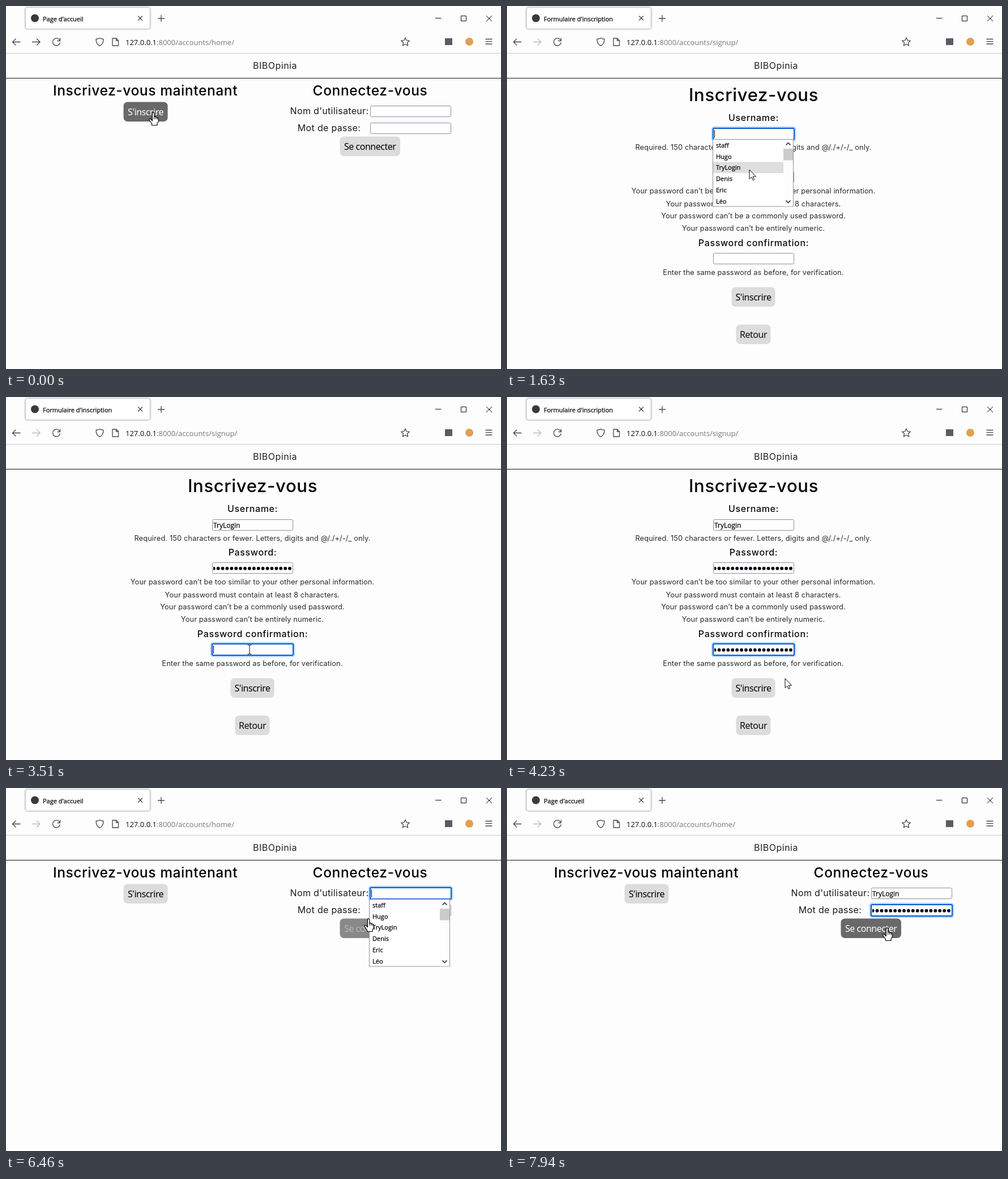
These frames come from a looping animation (874 px wide and 641 px high, 8000 ms). An HTML page:

```html
<!DOCTYPE html>
<html lang="fr">
<head>
<meta charset="utf-8">
<title>Inscription</title>
<style>
html, body { margin: 0; width: 100%; height: 100%; overflow: hidden; background: #fdfdfd; }
#stage { display: block; width: 874px; height: 641px; }
text { font-family: "Open Sans", "Noto Sans", sans-serif; fill: #0c0c0d; }
.mid { text-anchor: middle; }
.brand, .h1, .h2, .label, .plain, .help { font-family: Inter, sans-serif; }
.brand { font-size: 16px; letter-spacing: .03em; fill: #222; }
.h1 { font-size: 31px; font-weight: 450; letter-spacing: .022em; fill: #000; }
.h2 { font-size: 24.5px; font-weight: 450; letter-spacing: .025em; fill: #000; }
.label { font-size: 16px; font-weight: 500; letter-spacing: .04em; }
.plain { font-size: 16px; letter-spacing: .02em; fill: #1a1a1a; }
.help { font-size: 12.8px; letter-spacing: .01em; fill: #2a2a2a; }
.btn { font-size: 16px; letter-spacing: -.03em; font-family: "Noto Sans", "Open Sans", sans-serif; }
.tab { font-size: 11px; }
.url { font-size: 13px; }
.value { font-size: 12px; }
.row { font-size: 11px; }
.tab, .value, .row { fill: #000; stroke: #000; stroke-width: .25px; }
.icon { fill: none; stroke: #45454f; stroke-width: 1.3; stroke-linecap: round; stroke-linejoin: round; }
.win { fill: none; stroke: #111; stroke-width: 1; }
</style>
</head>
<body>
<svg id="stage" viewBox="0 0 874 641">
  <defs>
    <filter id="soft" x="-10%" y="-30%" width="120%" height="160%">
      <feDropShadow dx="0" dy="0" stdDeviation="1.6" flood-color="#000" flood-opacity=".45"/>
    </filter>
    <clipPath id="tabClip"><rect x="35" y="3" width="218.500" height="37" rx="4"/></clipPath>
  </defs>
  <rect width="874" height="641" fill="#fdfdfd"/>

  <g id="chrome">
    <rect x="32" y="1" width="225" height="41" rx="5" fill="#ececee"/>
    <rect x="35" y="3" width="218.500" height="37" rx="4" fill="#fff" filter="url(#soft)"/>
    <g clip-path="url(#tabClip)"><circle id="burst" cx="51" cy="22" fill="#2090ff"/></g>
    <circle cx="51" cy="21.500" r="7" fill="#3a3a3a"/>
    <text id="title" class="tab" x="65" y="26.500"></text>
    <path class="icon" d="M233.500 18l7 7m0-7l-7 7M268.500 22h11M274 16.500v11"/>
    <path class="win" d="M758 21.500h10.500M803.500 17.500h9v9h-9zM848 17l10 10m0-10l-10 10"/>
    <path class="icon" d="M25 63.500H11.500m5.500-5.500l-5.500 5.500 5.500 5.500"/>
    <path id="forward" class="icon" d="M46.500 63.500H60m-5.500-5.500l5.500 5.500-5.500 5.500"/>
    <path id="reload" class="icon" d="M94.500 60a6.500 6.500 0 1 0 .8 5M95.500 57v4.500H91"/>
    <path class="icon" d="M165.500 56.500c2 1.300 4 1.800 6.500 2 0 5.500-1.500 9.500-6.500 12-5-2.500-6.500-6.500-6.500-12 2.500-.2 4.500-.7 6.500-2z"/>
    <path class="icon" d="M188 57h6.500l4 4v9H188zM194.500 57v4h4"/>
    <path class="icon" d="M705 56l2.200 4.700 5.200.6-3.900 3.500 1.100 5.200-4.600-2.700-4.600 2.700 1.100-5.200-3.900-3.500 5.200-.6z"/>
    <rect x="775" y="57" width="13" height="12" fill="#5b5b66"/>
    <circle cx="818" cy="63" r="7" fill="#e0a050"/>
    <path class="icon" d="M847 58.500h11M847 62.700h11M847 67h11"/>
    <text class="url" x="211" y="69">127.0.0.1<tspan id="path" fill="#77777d"></tspan></text>
    <path d="M0 83.500H874" stroke="#ccccd0"/>
    <path d="M0 127.500H874" stroke="#111"/>
    <text class="brand mid" x="475" y="111">BIBOpinia</text>
  </g>

  <g id="home"></g>
  <g id="signup"></g>
  <g id="list"></g>
  <rect id="status" x="-.5" y="637.500" width="166" height="6" fill="#f0f0f4" stroke="#c4c4cc"/>
  <g id="cursor" stroke="#000" fill="#fff" stroke-linejoin="round">
    <path id="arrow" d="M0 0V16.500L3.800 13L6.300 18.600L8.700 17.600L6.300 12.200H11.500Z"/>
    <g id="hand">
      <path stroke-width="1.200" d="M-1.700 1.600a1.700 1.700 0 0 1 3.400 0V8a1.700 1.700 0 0 1 3 .8a1.600 1.600 0 0 1 2.600.9a1.400 1.400 0 0 1 2 1.200V16L7 19V22.500H-2.500V20L-7 13.500a1.500 1.500 0 0 1 2.200-2L-1.700 14.500Z"/>
      <path fill="none" d="M1.700 8v4M4.700 9v3M7.200 10v2.500"/>
    </g>
    <path id="beam" fill="none" d="M-3.500-8H-1L0-7.200 1-8H3.500M0-7V7M-3.500 8H-1L0 7.200 1 8H3.500"/>
  </g>
</svg>

<script>
const LOOP = 8000, TO_SIGNUP = 440, TO_HOME = 5290;
const USER = "TryLogin";
const $ = id => document.getElementById(id);
const clamp = v => v < 0 ? 0 : v > 1 ? 1 : v;
const easeOut = p => 1 - (1 - clamp(p)) ** 2;
const show = (el, on) => el.setAttribute("visibility", on ? "inherit" : "hidden");

function add(parent, tag, attrs, content) {
  const el = document.createElementNS("http://www.w3.org/2000/svg", tag);
  for (const k in attrs) el.setAttribute(k, attrs[k]);
  if (content) el.textContent = content;
  parent.appendChild(el);
  return el;
}
const box = (parent, x, y, width, height, fill, rx = 0) =>
  add(parent, "rect", { x, y, width, height, fill, rx });
const centred = (parent, cls, x, y, str) =>
  add(parent, "text", { class: cls + " mid", x, y }, str);

function button(parent, x, y, w, str) {
  const back = box(parent, x, y, w, 34.5, "#dcdcdc", 7);
  const label = centred(parent, "btn", x + w / 2, y + 23.5, str);
  return level => {
    const mix = (a, b) => Math.round(a + (b - a) * level);
    const bg = mix(220, 105), fg = mix(0, 255);
    back.setAttribute("fill", `rgb(${bg},${bg},${bg})`);
    label.style.fill = `rgb(${fg},${fg},${fg})`;
  };
}

// filled: time the value appears; focus: [from, to]
function field(parent, x, y, secret, filled, focus) {
  const idle = add(parent, "rect", { x: x + .5, y: y + .5, width: 142, height: 19, rx: 2, fill: "#fff", stroke: "#8f8f9d" });
  const ring = add(parent, "g", {});
  box(ring, x - 4, y - 4, 151, 28, "#e6f2ff", 6);
  box(ring, x - 3, y - 3, 149, 26, "#a9d5ff", 5);
  box(ring, x - 1, y - 1, 145, 22, "#0a58d0", 3);
  box(ring, x + 1, y + 1, 141, 18, "#fff", 1);
  const value = add(parent, "svg", { x: x + 2, y, width: 140, height: 20 });
  if (secret) {
    for (let i = 0; i < 18; i++)
      add(value, "circle", { cx: 135 - i * 7.9, cy: 10.7, r: 2.9, fill: "#000" });
  } else add(value, "text", { class: "value", x: 0, y: 14.5 }, USER);
  const caret = box(parent, x + 2, y + 3, 1, 14, "#000");
  return (t, blink) => {
    const focused = t >= focus[0] && t < focus[1], full = t >= filled;
    show(idle, !focused);
    show(ring, focused);
    show(value, full);
    show(caret, focused && blink);
    caret.setAttribute("x", x + (!full ? 2 : secret ? 140 : 51));
  };
}

const home = $("home"), signup = $("signup"), list = $("list");

centred(home, "h2", 246, 158, "Inscrivez-vous maintenant");
centred(home, "h2", 643, 158, "Connectez-vous");
centred(home, "plain", 571, 191, "Nom d'utilisateur:");
centred(home, "plain", 570.5, 220.5, "Mot de passe:");
const joinBtn = button(home, 207.5, 169.5, 78, "S'inscrire");
const loginBtn = button(home, 589.5, 230.5, 106.5, "Se connecter");

centred(signup, "h1", 435.5, 167.5, "Inscrivez-vous");
[["Username:", 203], ["Password:", 280], ["Password confirmation:", 423.5]]
  .forEach(([str, y]) => centred(signup, "label", 435.5, y, str));
[["Required. 150 characters or fewer. Letters, digits and @/./+/-/_ only.", 254],
 ["Your password can’t be too similar to your other personal information.", 331],
 ["Your password must contain at least 8 characters.", 353.5],
 ["Your password can’t be a commonly used password.", 375],
 ["Your password can’t be entirely numeric.", 397],
 ["Enter the same password as before, for verification.", 474.5]]
  .forEach(([str, y]) => centred(signup, "help", 435, y, str));
const sendBtn = button(signup, 396.5, 496.5, 77, "S'inscrire");
button(signup, 404.5, 562.5, 61, "Retour");

const signupFields = [
  field(signup, 364, 216, false, 1880, [TO_SIGNUP, 2700]),
  field(signup, 364, 292, true, 2960, [2700, 3480]),
  field(signup, 364, 436, true, 3700, [3510, TO_HOME])
];
const homeFields = [
  field(home, 643, 176, false, 6910, [TO_HOME, 7230]),
  field(home, 643, 206, true, 7420, [7230, LOOP])
];

// Suggestion list, drawn at its place on the signup page
const ROW = 19.7;
add(list, "rect", { x: 363.5, y: 235.5, width: 142, height: 118.5, fill: "#fff", stroke: "#8f8f9d" });
const mark = box(list, 364, 236, 124, ROW, "#dedede");
["staff", "Hugo", USER, "Denis", "Eric", "Léo"].forEach((name, i) =>
  add(list, "text", { class: "row", x: 369, y: 250 + i * ROW }, name));
box(list, 488, 236, 17, 117.5, "#fdfdfd");
box(list, 488, 252, 17, 20.5, "#cbcbcb");
add(list, "path", { d: "M492.500 245.500l4-4 4 4M492.500 343.500l4 4 4-4", fill: "none", stroke: "#505050", "stroke-width": 1.8 });

// Pointer: time, x, y, shape from then on
const PATH = [
  [0, 260, 188, "hand"], [TO_SIGNUP, 260, 188, "arrow"], [560, 260, 188, "arrow"],
  [1040, 398, 250, "arrow"], [1340, 398, 250, "arrow"], [1630, 428, 289, "arrow"],
  [1880, 428, 289, "arrow"], [2220, 425, 398, "beam"], [2670, 419, 311, "beam"],
  [3000, 419, 311, "beam"], [3450, 430, 446, "beam"], [3700, 430, 446, "beam"],
  [3920, 521, 409, "arrow"], [4230, 491, 497, "arrow"], [4440, 491, 497, "arrow"],
  [4600, 472, 505, "hand"], [4800, 447, 514, "hand"], [TO_HOME, 447, 514, "arrow"],
  [5560, 447, 514, "arrow"], [5890, 482, 352, "arrow"], [6100, 482, 352, "arrow"],
  [6320, 594, 262, "hand"], [6460, 640, 231, "hand"], [6500, 645, 231, "arrow"],
  [6890, 690, 244, "arrow"], [6910, 690, 244, "arrow"], [7200, 690, 213, "beam"],
  [7480, 690, 213, "beam"], [7640, 681, 231, "hand"], [7940, 671, 247, "hand"]
];

function pointer(t) {
  const i = PATH.findLastIndex(k => k[0] <= t);
  const [t0, x0, y0, shape] = PATH[i];
  const [t1, x1, y1] = PATH[i + 1] || [LOOP, x0, y0];
  const p = (t - t0) / (t1 - t0);
  const e = (p + p * p * (3 - 2 * p)) / 2;
  return { x: x0 + (x1 - x0) * e, y: y0 + (y1 - y0) * e, shape };
}

// Button fade: in from `on`, out again from `off`
const hover = (t, on, off = LOOP) =>
  easeOut((Math.min(t, off) - on) / 300) * (1 - easeOut((t - off) / 300));

// Moments that restart the caret's blink
const CARET = [0, TO_SIGNUP, 1880, 2700, 2960, 3510, 3700, TO_HOME, 6910, 7230, 7420];

function render(t) {
  const onSignup = t >= TO_SIGNUP && t < TO_HOME;
  show(home, !onSignup);
  show(signup, onSignup);
  $("title").textContent = onSignup ? "Formulaire d'inscription" : "Page d'accueil";
  $("path").textContent = `:8000/accounts/${onSignup ? "signup" : "home"}/`;
  $("forward").style.stroke = t < TO_SIGNUP ? "#45454f" : "#bcbcc0";
  const busy = t >= TO_SIGNUP && t < 1040 || t >= TO_HOME && t < 5890;
  $("reload").style.stroke = busy ? "#bcbcc0" : "#45454f";

  const b = (t - (t < TO_HOME ? TO_SIGNUP : TO_HOME) - 24) / 375;
  const grow = easeOut(b);
  $("burst").setAttribute("r", 8 * (1 + 39 * grow));
  $("burst").setAttribute("opacity", b < 0 ? 0 : .4 * (1 - grow));
  $("status").setAttribute("opacity", t < TO_SIGNUP ? clamp((t - 30) / 90) : 0);

  joinBtn(t < TO_SIGNUP ? 1 : 0);
  sendBtn(hover(t, 4600));
  loginBtn(t < 7640 ? hover(t, 6320, 6480) : hover(t, 7640));

  const blink = (t - CARET.findLast(c => c <= t)) % 1000 < 500;
  (onSignup ? signupFields : homeFields).forEach(f => f(t, blink));

  const { x, y, shape } = pointer(t);
  const [dx, dy] = onSignup ? [0, 0] : [278, -39];
  show(list, t >= 700 && t < 1880 || t >= 5700 && t < 6910);
  list.setAttribute("transform", `translate(${dx} ${dy})`);
  const row = Math.floor((y - dy - 236) / ROW);
  const over = shape === "arrow" && x - dx >= 364 && x - dx < 488 && row >= 0 && row < 6;
  mark.setAttribute("y", 236 + row * ROW);
  mark.setAttribute("opacity", over ? 1 : 0);

  $("cursor").setAttribute("transform", `translate(${x.toFixed(1)} ${y.toFixed(1)})`);
  ["arrow", "hand", "beam"].forEach(id => show($(id), id === shape));
}

const start = performance.now();
function tick() {
  render((performance.now() - start) % LOOP);
  requestAnimationFrame(tick);
}
tick();
</script>
</body>
</html>
```
